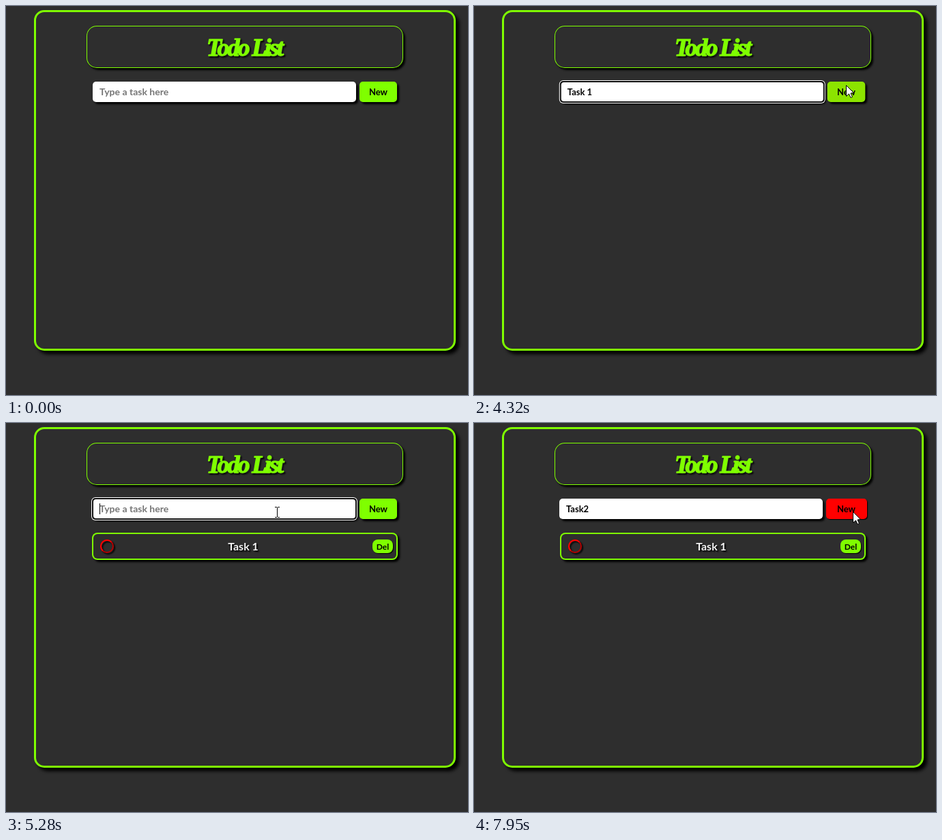
These frames come from a looping animation (677x571 px, 8000 ms). An HTML page with a canvas:

```html
<!DOCTYPE html>
<html lang="en">
<head>
<meta charset="utf-8">
<title>Todo List</title>
<style>
html, body { margin: 0; width: 100%; height: 100%; overflow: hidden; background: #2e2e2e; }
canvas { display: block; }
</style>
</head>
<body>
<canvas id="stage" width="677" height="571"></canvas>
<script>
const LOOP = 8000, TICK = 30, BLINK = 510, FADE = 300;
const LIME = '#7fff00', BG = '#2e2e2e';
const SANS = 'Lato, "Noto Sans", sans-serif';
const c = document.getElementById('stage').getContext('2d');

// time, x, y of the pointer
const path = [
  [120, 648, 47], [210, 560, 98], [270, 505, 126], [330, 430, 139], [450, 370, 133],
  [659, 370, 133], [660, 370, 132], [3750, 370, 132], [3930, 440, 176], [4110, 515, 156],
  [4230, 539, 126], [4320, 545, 116], [4410, 546, 118], [4740, 546, 120],
  [4800, 515, 126], [4890, 416, 131], [5010, 397, 131], [7500, 397, 131],
  [7650, 517, 133], [7740, 550, 131], [7890, 555, 130], [LOOP, 555, 130]
];
// time, value of the input
const typing = [
  [0, ''], [810, ''], [2070, 'T'], [2460, 'Ta'], [2670, 'Tas'], [2970, 'Task'],
  [3180, 'Task '], [3330, 'Task 1'], [4650, ''], [5160, ''], [6030, 'T'],
  [6120, 'Ta'], [6240, 'Tas'], [6450, 'Task'], [6810, 'Task2']
];
const focusSpans = [[810, 4545], [5160, 7920]];
const hoverSpans = [[4288, 4798], [7650, LOOP]];
const ITEM_AT = 4650;

const inside = (spans, t) => spans.some(([a, b]) => t >= a && t < b);
const mix = (a, b, p) => a + (b - a) * p;

// the CSS "ease" curve
function ease(x) {
  if (x <= 0) return 0;
  if (x >= 1) return 1;
  let lo = 0, hi = 1, s;
  for (let i = 0; i < 20; i++) {
    s = (lo + hi) / 2;
    const u = 1 - s;
    if (.75 * u * u * s + .75 * u * s * s + s * s * s < x) lo = s; else hi = s;
  }
  const u = 1 - s;
  return .3 * u * u * s + 3 * u * s * s + s * s * s;
}

function hoverAt(t) {
  return Math.max(...hoverSpans.map(([a, b]) =>
    t < b ? ease((t - a) / FADE) : 1 - ease((t - b) / FADE)));
}

function pointerAt(t) {
  if (t < path[0][0]) return null;
  const i = path.findIndex(k => k[0] > t);
  const a = path[i - 1], b = path[i], p = (t - a[0]) / (b[0] - a[0]);
  return [Math.round(mix(a[1], b[1], p)), Math.round(mix(a[2], b[2], p))];
}

function shadow(offset, blur = offset) {
  c.shadowColor = '#000';
  c.shadowOffsetX = c.shadowOffsetY = offset;
  c.shadowBlur = blur;
}

function rounded(x, y, w, h, r, fill) {
  c.beginPath();
  c.roundRect(x, y, w, h, r);
  c.fillStyle = fill;
  c.fill();
}

function box(x, y, w, h, r, fill, cast = 0, border = 0) {
  c.save();
  if (cast) shadow(cast);
  rounded(x, y, w, h, r, border ? LIME : fill);
  c.restore();
  if (border) rounded(x + border, y + border, w - 2 * border, h - 2 * border, r - border, fill);
}

function text(str, x, y, size, color, align = 'left') {
  c.font = `bold ${size}px ${SANS}`;
  c.textAlign = align;
  c.fillStyle = color;
  c.fillText(str, x, y);
}

function drawTitle() {
  box(118, 29, 464, 62, 15, BG, 3, 1);
  c.save();
  c.font = 'italic bold 36px "Liberation Serif", "Noto Serif", serif';
  c.letterSpacing = '-3.1px';
  c.textAlign = 'left';
  c.lineJoin = 'round';
  c.lineWidth = 1.4;
  c.strokeStyle = c.fillStyle = LIME;
  shadow(2);
  c.strokeText('Todo List', 294, 73);
  c.shadowColor = 'transparent';
  c.fillText('Todo List', 294, 73);
  c.restore();
}

function drawInput(t, p) {
  const x = 127 - 2 * p, focused = inside(focusSpans, t);
  box(x, 111, 386, 30, 5, '#fff', 3);
  if (focused) {
    rounded(x - 2, 109, 390, 34, 6, '#fff');
    rounded(x - 1, 110, 388, 32, 5, '#101010');
    rounded(x + 1, 112, 384, 28, 4, '#fff');
  }
  const [since, value] = typing.filter(k => k[0] <= t).pop();
  const left = x + 10;
  if (value) text(value, left, 131, 13, '#000');
  else text('Type a task here', left, 131, 14, '#757575');
  if (focused && Math.floor((t - since) / BLINK) % 2 === 0) {
    c.font = `bold 13px ${SANS}`;
    c.fillStyle = '#000';
    c.fillRect(Math.floor(left + c.measureText(value).width), 118, 1, 16);
  }
}

function drawNew(p) {
  const color = `rgb(${mix(127, 255, p)}, ${mix(255, 0, p)}, 0)`;
  box(518 - 2 * p, 111, 55 + 5 * p, 30, 5, color, mix(3, 1, p));
  text('New', 545.5, 131, 13, '#000', 'center');
}

function arc(from, sweep, color) {
  c.beginPath();
  c.arc(148, 181, 9, from, from + sweep);
  c.strokeStyle = color;
  c.stroke();
}

function drawItem() {
  box(126, 161, 448, 40, 8, BG, 3, 2);
  c.save();
  shadow(2);
  c.lineWidth = 2;
  arc(0, Math.PI * 2, '#b40000');
  c.shadowColor = 'transparent';
  arc(Math.PI * .75, Math.PI, '#f00');
  c.restore();
  c.save();
  shadow(2);
  text('Task 1', 347.5, 187, 16, '#f5f5f5', 'center');
  c.restore();
  box(537, 171, 30, 20, 8, LIME, 1);
  text('Del', 552, 186, 12, '#000', 'center');
}

function drawPointer(x, y, p) {
  if (y > 110 && y < 142 && x > 126 && x < 514 - 2 * p) {
    c.fillStyle = '#000';
    c.fillRect(x, y - 7, 1, 14);
    for (const dy of [-8, 7]) {
      c.fillRect(x - 3, y + dy, 3, 1);
      c.fillRect(x + 1, y + dy, 3, 1);
    }
    return;
  }
  c.save();
  c.translate(x + .5, y + .5);
  c.beginPath();
  for (const [px, py] of [[0, 0], [0, 16], [4, 12.5], [6.5, 18], [9, 17], [6.5, 11.5], [11, 11]]) c.lineTo(px, py);
  c.closePath();
  c.fillStyle = '#fff';
  c.fill();
  c.lineWidth = 1;
  c.strokeStyle = '#000';
  c.stroke();
  c.restore();
}

function draw(t) {
  const p = hoverAt(t), pointer = pointerAt(t);
  c.fillStyle = BG;
  c.fillRect(0, 0, 677, 571);
  box(41, 6, 618, 500, 15, BG, 5, 3);
  drawTitle();
  drawInput(t, p);
  drawNew(p);
  if (t >= ITEM_AT) drawItem();
  if (pointer) drawPointer(...pointer, p);
}

const start = performance.now();
function frame() {
  const t = (performance.now() - start) % LOOP;
  draw(Math.floor(t / TICK) * TICK);
  requestAnimationFrame(frame);
}
frame();
</script>
</body>
</html>
```
